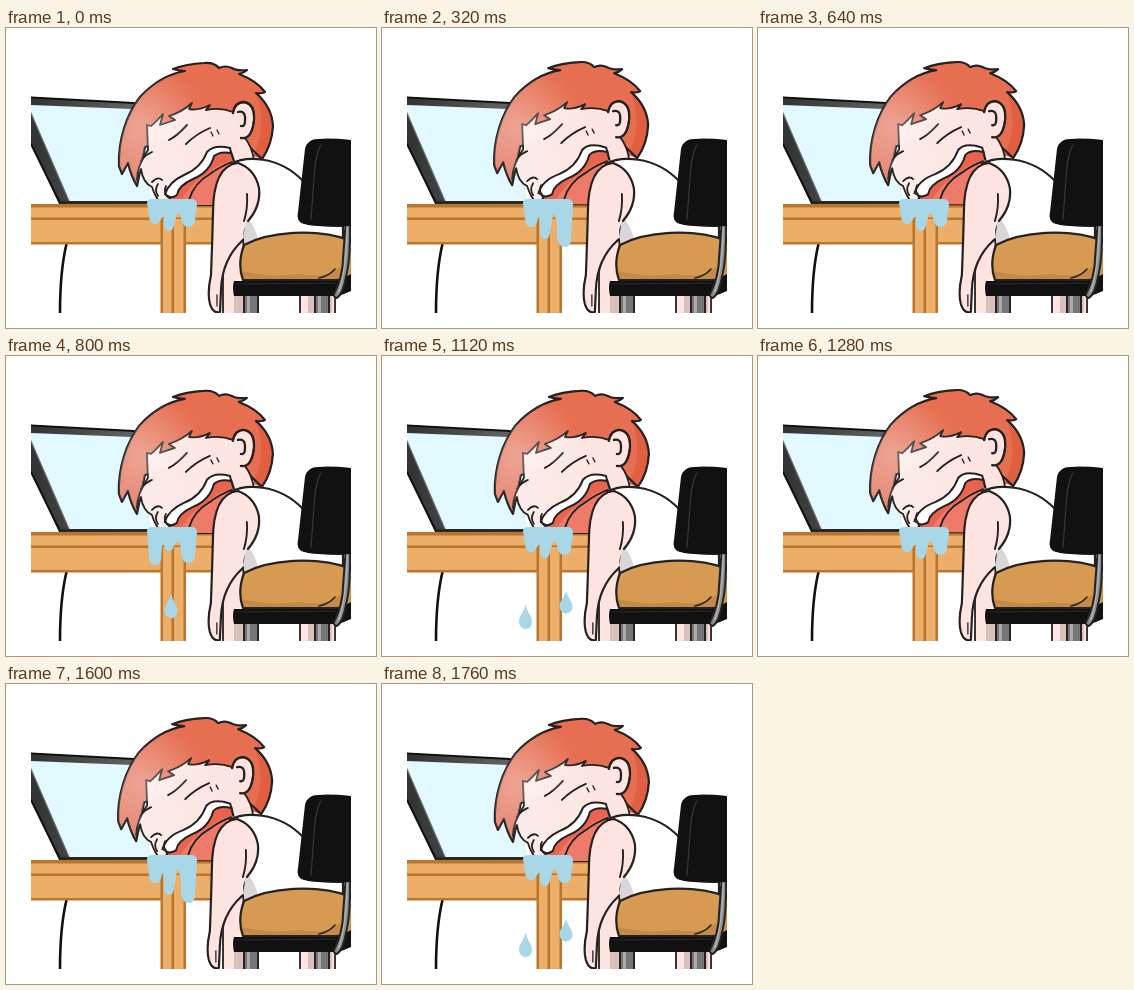
An HTML page with a canvas that plays this animation: 370x300 px, repeating every 1920 ms.

```html
<!DOCTYPE html>
<html lang="en">
<head>
<meta charset="utf-8">
<title>Asleep at the desk</title>
<style>
html, body { margin: 0; width: 100%; height: 100%; overflow: hidden; background: #fff; }
canvas { display: block; width: 370px; height: 300px; }
</style>
</head>
<body>
<canvas id="stage" width="370" height="300"></canvas>
<script>
const ctx = document.getElementById('stage').getContext('2d');
const INK = '#242120', SKIN = '#fde4e0', SHADE = '#d9c0bb', WATER = '#a8d8e8', BLACK = '#111';
const WOOD = '#ecae69', GRAIN = '#b8772d';
const STEP = 160, STEPS = 12;

function shape(d, fill, stroke, width = 2.2) {
  const path = new Path2D(d);
  if (fill) { ctx.fillStyle = fill; ctx.fill(path); }
  if (stroke) { ctx.strokeStyle = stroke; ctx.lineWidth = width; ctx.stroke(path); }
}
const line = (d, width, color = INK) => shape(d, null, color, width);

function box(x, y, w, h, color) {
  ctx.fillStyle = color;
  ctx.fillRect(x, y, w, h);
}

function gradient(x0, y0, x1, y1, from, to) {
  const g = ctx.createLinearGradient(x0, y0, x1, y1);
  g.addColorStop(0, from);
  g.addColorStop(1, to);
  return g;
}

function shifted(dx, dy, draw) {
  ctx.save();
  ctx.translate(dx, dy);
  draw();
  ctx.restore();
}

function drawDesk() {
  shape('M25 69 L128 75 L145 176 H53 L25 116 Z', gradient(30, 0, 128, 0, '#333434', '#626464'));
  shape('M25 77 L126 81 L145 173 H63 L25 85 Z', '#e2faff');
  line('M25 69.5 L128 75', 1.8, BLACK);
  line('M25 85 L63 173', 1.2, '#6b6e6e');
  line('M25 116 L54 175', 2, BLACK);
  line('M54 174.5 H147', 2.5);
  line('M60.5 216 Q54 243 54 285', 2.6, BLACK);

  box(25, 176, 181, 40, WOOD);
  box(25, 176, 181, 3.5, GRAIN);
  box(25, 189.5, 181, 2.5, GRAIN);
  box(25, 214, 181, 2.5, GRAIN);
  box(155, 191, 25, 94, WOOD);
  for (const x of [154.5, 165.5, 177.5]) box(x, 191, 2.5, 94, GRAIN);
}

function drawMouth(b) {
  const left = 159 - 3 * b, top = 118 - 2 * b, corner = 225 + 2 * b;
  shape(`M${left + 4} 172 Q${left + 12} 153 188 143 Q201 136 203 126
    Q211 ${top} ${corner} 124 L229 136 L207 177 H170 Z`, '#e9644e', INK);
  shape('M174 174 Q186 153 204 144 Q216 133 229 133 L222 155 L207 177 H174 Z', '#ee7b69');
  line('M183 172 Q188 155 204 146 Q215 138 226 134', 1.8);
  shape(`M${left} 166 Q${left + 4} ${154 - 2 * b} 178 147 Q195 140 201 ${124 - 2 * b}
    Q208 ${top - 2} ${corner - 1} ${120 + b} L${corner} 125 Q214 ${top + 5} 208 128
    Q204 144 187 151 Q172 158 171 167 Q164 172 ${left} 166 Z`, '#fff', INK, 2);
}

function drawHead(b) {
  const hair = `M256 131 Q266 117 267 98 Q266 79 250 65 Q255 66 259 64
    Q251 53 233 46 Q238 45 241 42 Q230 43 226 40 Q219 37 213 40 Q208 34 198 35
    Q180 36 167 41 Q174 43 179 43 C161 46 146 56 134 69 C120 87 112 113 113 138
    L116 146 L122 135 Q125 148 131 158 L139 119 L220 88 L238 114 Z`;
  const face = `M142 122 L141 97 L145 98 Q149 95 157 86 L154 97 L169 92 L163 88
    Q176 84 186 75 Q184 79 183 81 Q192 83 204 77 Q202 80 200 82 Q214 79 227 84
    Q229 74 238 74 Q249 76 248 92 Q246 108 239 110 Q246 119 248 132 L224 140
    L205 177 H156 Q149 169 146 159 Q137 155 135 141 L131 152 Q131 138 142 122 Z`;
  shape(hair, gradient(118, 150, 190, 70, '#e5826f', '#e66f51'));
  shape('M250 65 Q266 80 267 98 Q266 119 256 131 L247 128 Q262 98 250 65 Z', '#e05f40');
  line(hair, 2.2);
  shape(face, gradient(135, 155, 240, 110, '#faece9', SKIN), INK, 1.8);
  line('M227 85 Q229 74 238 74 Q249 76 248 92 Q246 112 235 110', 2.3);
  line('M232 84 Q240 82 239 93 Q239 99 235 98', 2.3);

  line('M163 112 Q171 108 181 97 M180 116 Q190 106 204 100', 1.9);
  line('M135 133 Q139 127 146 124', 1.8);
  line('M205 104 L207 108 M211 102 L213 106', 1.3);
  drawMouth(b);
  shape('M147 155 Q149 149 156 152 Q153 158 154 166 L160 168 Q156 174 151 168 Z', '#fbefed');
  line('M146 154 Q152 148 156 152 M152 156 Q148 162 152 168 M160 158 Q157 164 162 169', 1.8);

  ctx.save();
  ctx.clip(new Path2D(hair));
  const glow = ctx.createRadialGradient(136, 99, 5, 136, 99, 64);
  glow.addColorStop(0, 'rgba(255,255,255,.3)');
  glow.addColorStop(1, 'rgba(255,255,255,0)');
  box(90, 30, 150, 140, glow);
  ctx.restore();
}

function drawArm() {
  const outer = `M232 135 C214 137 207 155 207 185 Q206 222 205 247
    Q201 265 204 276 Q207 286 214 284`;
  shape(`${outer} Q217 274 215 262 Q217 246 219 237 Q226 222 237 212
    Q236 203 242 193 Q255 178 253 160 Q249 141 232 135 Z`, SKIN);
  line(outer + ' L215 262 Q216 231 237 212', 2.2);
  line('M232 135 Q249 141 253 160 Q255 178 242 193', 2.2);
  line('M241 166 Q242 180 238 193', 1.9);
  line('M211 267 V278', 1.3);
}

function drawBody(b) {
  const lean = -2 * b;
  shape(`M${225 + lean} 136 C${239 + lean} 128 272 127 297 153 L302 159 V196 L337 198
    V210 L241 220 Q236 203 240 190 Z`, '#fff', INK);
  shape('M240 188 Q239 199 236 218 L252 211 Q249 198 240 188 Z', '#d8d6d6');
  shape('M237 211 Q217 226 217 246 V286 H240 V250 Z', SKIN, INK, 1.8);
  box(294, 264, 35, 22, SKIN);
  box(228, 266, 12, 20, SHADE);
  box(302, 266, 24, 20, SHADE);
  line('M294 265 V285 M329 265 V285', 1.8);
  shifted(lean, 0, drawArm);

  const shorts = 'M238 217 C262 204 310 199 346 213 V252 H237 Q231 236 238 217 Z';
  shape(shorts, '#d69a52');
  shape('M236 243 Q262 250 292 246 Q320 251 334 239 L346 252 H237 Z', '#c58a45');
  line(shorts, 2.2);
  line('M313 250 Q323 248 329 241', 1.6);
}

function drawChair() {
  for (const [x, w] of [[238, 14], [309, 14]]) {
    box(x, 266, w, 19, '#777');
    box(x + 3, 266, 3, 19, '#aaa');
    line(`M${x} 266 V285 M${x + w} 266 V285`, 2);
  }
  shape('M228 253 H331 L345 246 V263 L333 268 H228 Q226 260 228 253 Z', BLACK);
  line('M231 256 L329 255', 0.8, '#333');
  shape('M344 184 Q345 231 340 249 Q337 266 331 270 Q326 269 329 264 Q337 247 337 230 L340 190 Z',
    '#888b8c', INK, 2);
  line('M341 198 Q341 237 333 264', 1.2, '#bbb');
  shape('M306 112 Q316 109 346 112 V198 Q317 200 298 196 Q290 194 292 184 L299 121 Q300 115 306 112 Z', BLACK);
  line('M315 117 Q310 124 308 149 L305 191', 1.3, '#353737');
}

// Drip depths for the left, middle and right strands.
const DRIPS = [[196, 203, 199], [209, 195, 207], [199, 211, 219], [196, 202, 199]];

function drawPool(phase) {
  const [l, m, r] = DRIPS[phase];
  shape(`M141 175 Q141 171 146 171 H186 Q191 171 191 177 L189 ${r - 6}
    Q187 ${r + 1} 182 ${r} Q177 ${r} 175 ${r - 9} Q175 184 171 186 L168 ${m - 6}
    Q167 ${m} 163 ${m} Q159 ${m} 158 ${m - 6} Q158 184 156 190 L155 ${l - 5}
    Q153 ${l + 1} 149 ${l} Q143 ${l} 143 ${l - 9} Z`, WATER);
}

function drop(x, y, h = 25) {
  shape(`M${x} ${y - h / 2} C${x + 2} ${y - 4} ${x + 7} ${y} ${x + 6.5} ${y + 6}
    C${x + 5} ${y + h / 2 + 2} ${x - 5} ${y + h / 2 + 2} ${x - 6.5} ${y + 5}
    C${x - 7} ${y} ${x - 2} ${y - 4} ${x} ${y - h / 2} Z`, WATER);
}

function drawWater(step) {
  const phase = step % 4;
  drawPool(phase);
  if (phase === 1) drop(165, 250);
  if (phase === 3) {
    const first = step === 3;
    drop(first ? 147.5 : 143.5, first ? 243 : 261, first ? 20 : 25);
    drop(184, first ? 258 : 246, 23);
  }
}

function render(now) {
  const step = Math.floor(now / STEP) % STEPS;
  // Squared, so the sleeper rests longer than the chest stays raised.
  const breath = ((1 - Math.cos(step * Math.PI / 3)) / 2) ** 2;
  box(0, 0, 370, 300, '#fff');
  ctx.save();
  ctx.beginPath();
  ctx.rect(25, 0, 320, 285);
  ctx.clip();
  ctx.lineCap = ctx.lineJoin = 'round';
  drawDesk();
  shifted(-1.5 * breath, -1.5 * breath, () => drawHead(breath));
  drawBody(breath);
  drawChair();
  drawWater(step);
  ctx.restore();
}

const start = performance.now();
function tick() {
  render(performance.now() - start);
  requestAnimationFrame(tick);
}
tick();
</script>
</body>
</html>
```
